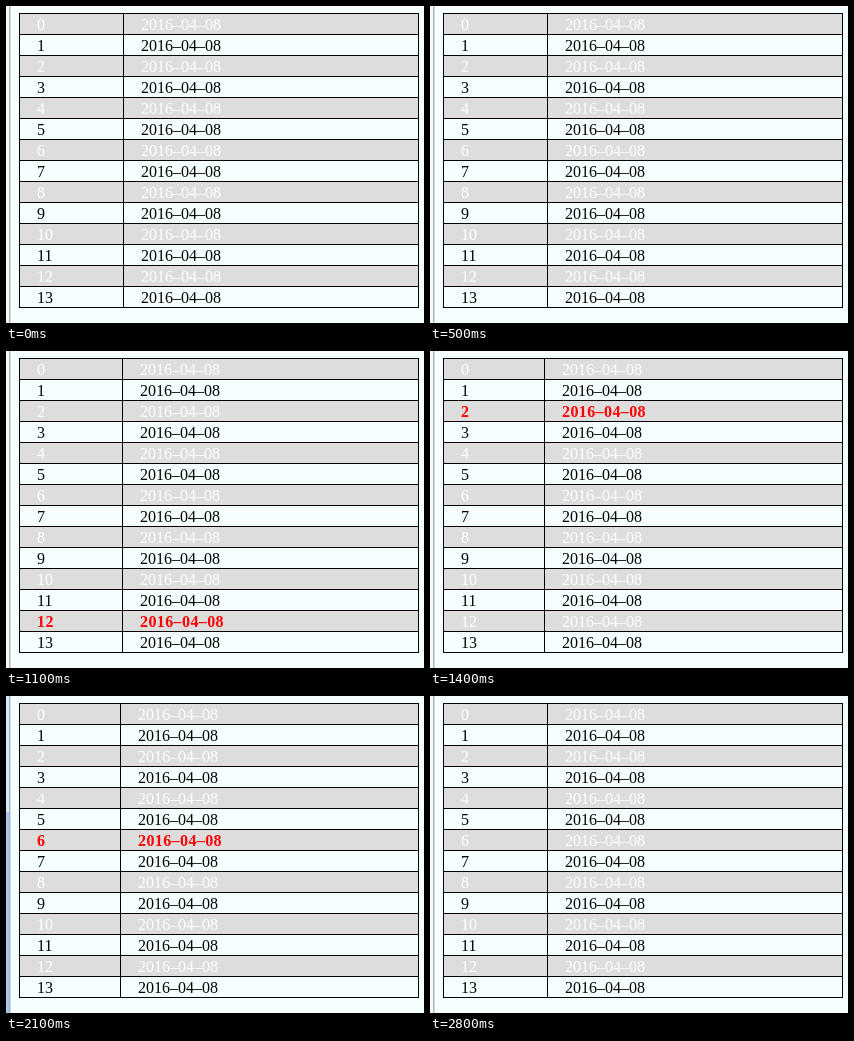
Write an HTML page with a canvas that moves like this. It is 418 px wide and 317 px high and loops after 2.9 s.

```html
<!DOCTYPE html>
<html lang="en">
<head>
<meta charset="utf-8">
<title>Row hover</title>
<style>
html, body { margin: 0; width: 100%; height: 100%; overflow: hidden; background: #f5ffff; }
canvas { display: block; }
</style>
</head>
<body>
<canvas id="stage" width="418" height="317"></canvas>
<script>
const ctx = document.getElementById('stage').getContext('2d');
const LOOP = 2900, STEP = 100;
const ROWS = 14, ROW_H = 21, LEFT = 13, TOP = 7, WIDTH = 400, PAD = 18;
const NONE = -1;

// Hovered row for each step, starting at 300 ms
const HOVER_START = 300;
const hover = [5, 2, NONE, 1, 3, 6, 8, 10, 12, 9, 5, 2, 4, 7, 8, 5, 2, 4, 6, 8, 9, 12];

function box(x, y, w, h, color) {
  ctx.fillStyle = color;
  ctx.fillRect(x, y, w, h);
}

function label(text, x, y, color, bold) {
  ctx.font = (bold ? 'bold ' : '') + '16px "Liberation Serif", "Times New Roman", serif';
  ctx.letterSpacing = bold ? '0.4px' : '0px';
  ctx.fillStyle = color;
  ctx.fillText(text, x, y);
}

function drawEdge(focused) {
  box(0, 0, 3, 317, focused ? '#dfebf8' : '#f6fafb');
  if (focused) box(0, 116, 3, 201, '#a9c8ee');
  box(3, 0, 1, 317, focused ? '#9fb0c4' : '#a9b2ba');
  box(4, 0, 1, 317, '#d5dee2');
}

// The bold row widens its cells, which moves the column line
function columnX(row) {
  if (row === NONE) return 117;
  return row > 9 ? 116 : 114;
}

function draw(t) {
  const active = hover[Math.floor((t - HOVER_START) / STEP)] ?? NONE;
  const col = columnX(active);
  box(0, 0, 418, 317, '#f5ffff');
  drawEdge(t >= 1700 && t < 2800);

  for (let i = 0; i < ROWS; i++) {
    const y = TOP + i * ROW_H;
    const even = i % 2 === 0;
    const on = i === active;
    const color = on ? '#f00' : even ? '#fff' : '#000';
    if (even) box(LEFT, y, WIDTH, ROW_H, '#ddd');
    box(LEFT, y, WIDTH, 1, '#000');
    label(String(i), LEFT + PAD, y + 17, color, on);
    label('2016–04–08', col + PAD, y + 17, color, on);
  }

  const height = ROWS * ROW_H + 1;
  box(LEFT, TOP + height - 1, WIDTH, 1, '#000');
  for (const x of [LEFT, col, LEFT + WIDTH - 1]) box(x, TOP, 1, height, '#000');
}

const start = performance.now();
function tick() {
  draw((performance.now() - start) % LOOP);
  requestAnimationFrame(tick);
}
tick();
</script>
</body>
</html>
```
